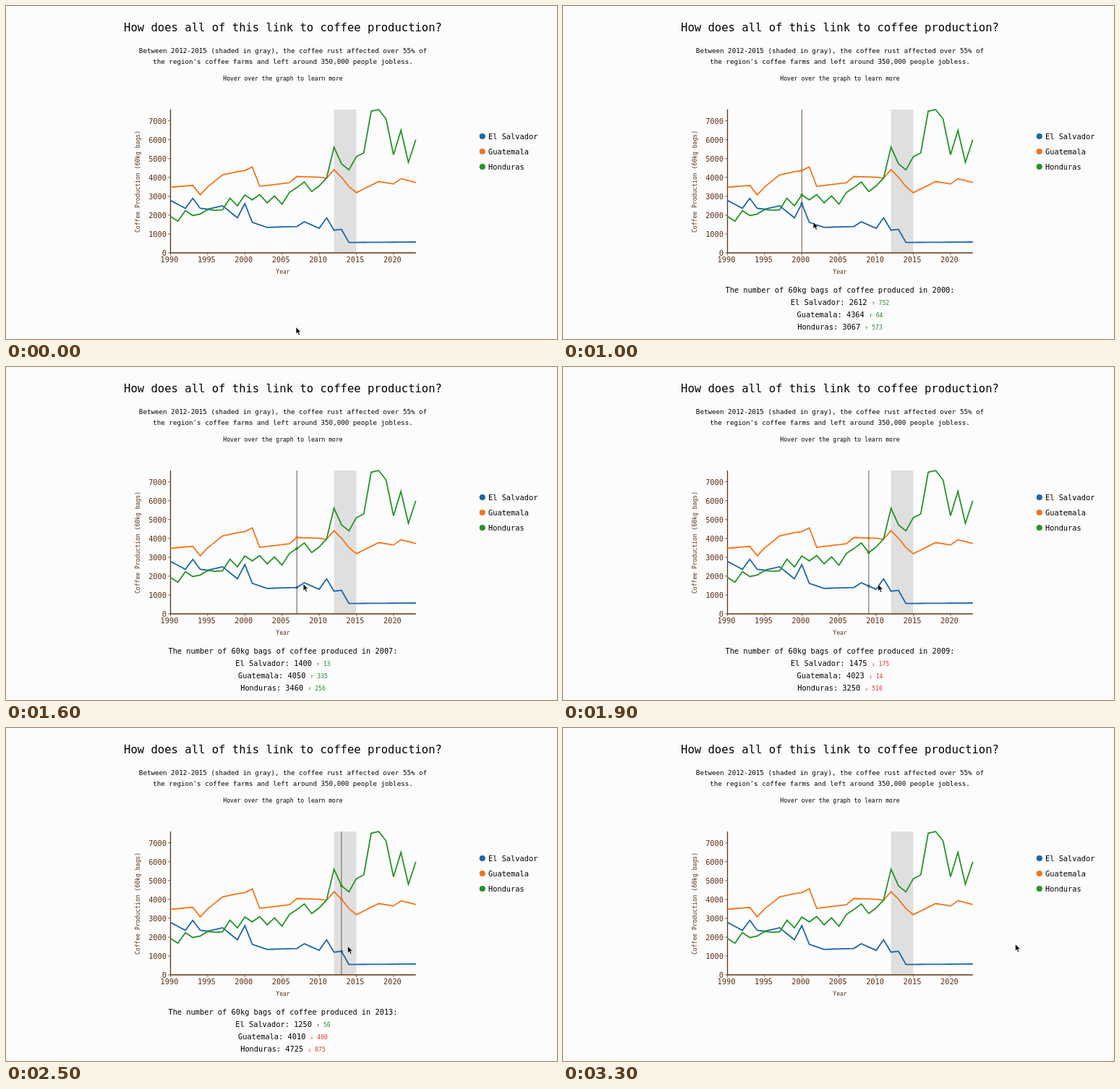
Write an HTML page that moves like this. It is 762 by 460 pixels and loops after 3400 ms.

```html
<!DOCTYPE html>
<html lang="en">
<head>
<meta charset="utf-8">
<title>Coffee production</title>
<style>
  html, body { margin: 0; width: 100%; height: 100%; overflow: hidden; background: #fdfcfd; }
  svg { display: block; }
  text { font: 10.33px "DejaVu Sans Mono", "Noto Sans Mono", monospace; white-space: pre; }
  .mid { text-anchor: middle; }
  .end { text-anchor: end; }
  .axis { fill: #5c2e12; }
  .small, tspan { font-size: 8.08px; }
  .sub { font-size: 9.2px; }
  .title { font-size: 15.55px; }
</style>
</head>
<body>
<svg id="stage" width="762" height="460" viewBox="0 0 762 460"></svg>
<script>
const LOOP = 3400, STEP = 100;
const LEFT = 227.5, TOP = 143, BOTTOM = 341, FIRST = 1990, YEAR_WIDTH = 10.28;
const xOf = i => LEFT + i * YEAR_WIDTH;
const yOf = v => BOTTOM - v * 0.02605;
const RIGHT = xOf(33);

// Yearly key values; a gap (_) runs straight between its neighbours, plus an alternating wobble
const _ = null;
const series = [
  { name: 'El Salvador', color: '#1c67a8', wobble: 0, keys: [
    2780, _, 2360, 2890, 2361, 2314, _, 2500, _, 1860, 2612, 1620, _, 1350, _, _, 1387,
    1400, 1650, _, 1300, 1860, 1200, 1250, 550, _, _, _, _, _, _, _, _, 575] },
  { name: 'Guatemala', color: '#f37518', wobble: 0, keys: [
    3480, _, _, 3580, 3078, 3500, _, 4130, _, 4300, 4364, 4560, 3530, _, _, _, 3715,
    4050, _, _, 4010, 3960, 4410, 4010, 3515, 3190, _, _, 3780, _, 3650, 3930, _, 3730] },
  { name: 'Honduras', color: '#259528', wobble: 270, keys: [
    1930, _, _, 1980, 2060, 2295, 2260, 2280, 2900, 2494, 3067, _, 3090, _, _, 2580, 3204,
    3460, _, _, 3550, 3975, 5600, 4725, 4400, 5100, 5300, 7510, 7600, 7100, 5200, 6500, 4800, 6000] },
];

function fillGaps({ keys, wobble }) {
  return keys.map((v, i) => {
    if (v !== _) return v;
    let a = i, b = i;
    while (keys[a] === _) a--;
    while (keys[b] === _) b++;
    const base = keys[a] + (keys[b] - keys[a]) * (i - a) / (b - a);
    return Math.round(base + (i % 2 ? -wobble : wobble));
  });
}

const stage = document.getElementById('stage');

function add(tag, attrs, content = '', parent = stage) {
  const el = document.createElementNS('http://www.w3.org/2000/svg', tag);
  for (const key in attrs) el.setAttribute(key, attrs[key]);
  el.textContent = content;
  return parent.appendChild(el);
}
const label = (x, y, cls, content, parent) => add('text', { x, y, class: cls }, content, parent);

label(383, 35, 'mid title', 'How does all of this link to coffee production?');
label(383, 65, 'mid sub', 'Between 2012-2015 (shaded in gray), the coffee rust affected over 55% of');
label(383, 80.3, 'mid sub', "the region's coffee farms and left around 350,000 people jobless.");
label(383, 103, 'mid small', 'Hover over the graph to learn more');

add('rect', { x: xOf(22), y: TOP, width: xOf(25) - xOf(22), height: BOTTOM - TOP, fill: '#dfdfdf' });

let ticks = '';
for (let v = 0; v <= 7000; v += 1000) {
  ticks += `M${LEFT} ${yOf(v)}h-3.5`;
  label(222, yOf(v) + 3.9, 'end axis', v);
}
for (let i = 0; i <= 30; i += 5) {
  ticks += `M${xOf(i)} ${BOTTOM}v3.5`;
  label(xOf(i) - 1.5, 354.4, 'mid axis', FIRST + i);
}
add('path', { d: ticks, stroke: '#6b3f1c', 'stroke-width': 0.8 });
add('path', { d: `M${LEFT} ${TOP}V${BOTTOM}H${RIGHT}`, fill: 'none', stroke: '#5f3413', 'stroke-width': 1.3 });
label(383, 369.5, 'mid small axis', 'Year');
add('text', { transform: 'translate(185.3 242.5) rotate(-90)', class: 'mid small axis' },
  'Coffee Production (60kg bags)');

series.forEach((s, k) => {
  s.data = fillGaps(s);
  add('polyline', {
    points: s.data.map((v, i) => `${xOf(i)},${yOf(v)}`).join(' '),
    fill: 'none', stroke: s.color, 'stroke-width': 1.8,
  });
  add('circle', { cx: 658.8, cy: 180 + 21 * k, r: 4.1, fill: s.color });
  label(667, 183.8 + 21 * k, '', s.name);
});

const hover = add('g', {});
const rule = add('path', { stroke: '#765840', 'stroke-width': 1 }, '', hover);
const heading = label(383, 395.5, 'mid', '', hover);
const rows = series.map((s, k) => ({
  ...s,
  dot: add('circle', { r: 2, fill: s.color }, '', hover),
  text: label(383, 412.8 + 17.3 * k, 'mid', '', hover),
}));
const pointer = add('path', {
  d: 'M0 0V9.6L2.2 7.5L3.8 11.2L5.5 10.5L3.9 6.9H7Z',
  fill: '#000', stroke: '#fff', 'stroke-width': 0.7,
});

// The pointer comes up from below, slows down across the chart, rests, then leaves to the right
function pointerAt(t) {
  const mix = (a, b, f) => a + (b - a) * Math.min(Math.max(f, 0), 1);
  if (t < 400) return [mix(401, 207, t / 200), mix(443.5, 322, t / 200)];
  const glide = Math.min(t, 2700) - 600;
  const x = 287 + 267 * (1 - Math.exp(-glide / 1600));
  const exit = (t - 2900) / 400;
  return [mix(x, 625.5, exit), mix(297.5 + glide * 0.002, 298.5, exit)];
}

function showYear(i) {
  rule.setAttribute('d', `M${xOf(i)} ${TOP}V${BOTTOM}`);
  heading.textContent = `The number of 60kg bags of coffee produced in ${FIRST + i}:`;
  for (const { name, data, dot, text } of rows) {
    const change = data[i] - data[i - 1];
    dot.setAttribute('cx', xOf(i));
    dot.setAttribute('cy', yOf(data[i]));
    text.textContent = `${name}: ${data[i]} `;
    add('tspan', { fill: change < 0 ? '#e03c2c' : '#1f8a28' },
      `${change < 0 ? '↓' : '↑'} ${Math.abs(change)}`, text);
  }
}

let shown = -1;
function draw(now) {
  const step = Math.floor(now % LOOP / STEP);
  if (step !== shown) {
    shown = step;
    const [x, y] = pointerAt(step * STEP);
    pointer.setAttribute('transform', `translate(${x} ${y})`);
    const inside = x > LEFT && x < RIGHT && y > TOP && y < BOTTOM;
    hover.setAttribute('visibility', inside ? 'visible' : 'hidden');
    // The highlighted year trails the pointer slightly
    if (inside) showYear(Math.max(1, Math.round((x - 11 - LEFT) / YEAR_WIDTH)));
  }
  requestAnimationFrame(() => draw(performance.now() - start));
}
const start = performance.now();
draw(0);
</script>
</body>
</html>
```
